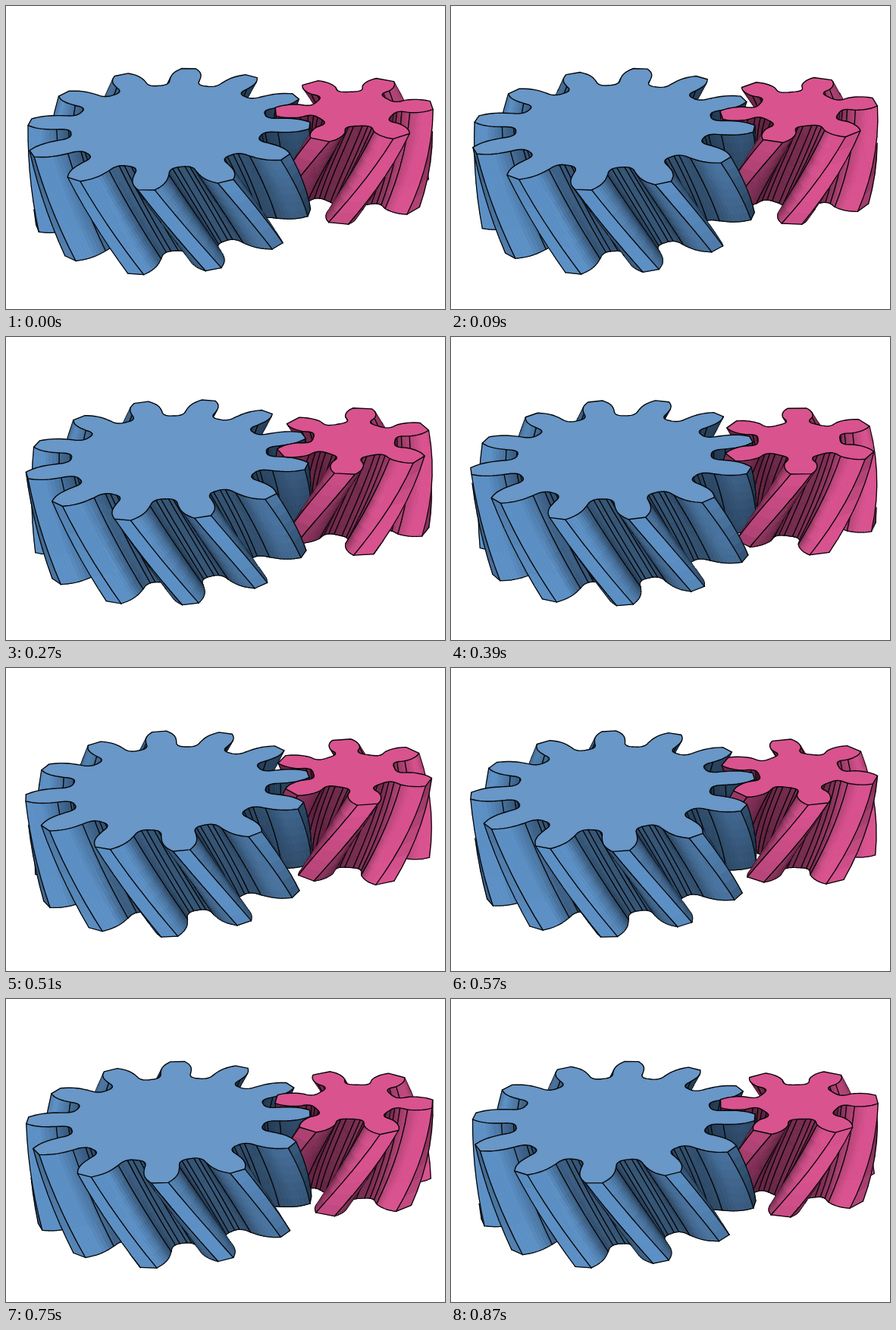
These frames come from a looping animation (579x400 px, 0.9 s). An HTML page with a canvas:

```html
<!DOCTYPE html>
<html lang="en">
<head>
<meta charset="utf-8">
<title>Helical gears</title>
<style>
html, body { margin: 0; width: 100%; height: 100%; overflow: hidden; background: #fff; }
canvas { display: block; }
</style>
</head>
<body>
<canvas id="stage" width="579" height="400"></canvas>
<script>
const ctx = document.getElementById('stage').getContext('2d');
const LOOP = 900, STEP = 30, SLICES = 7, SUB = 3;
const RAD = Math.PI / 180;
const HEIGHT = 0.637;
const LIGHT = [0, -0.85, 0.53];
const MESH = { x: .88, y: .18 };

// Half of a tooth, from tip corner to the middle of the gap: [radius, half angle].
const wheelTooth = [[1, .055], [.94, .1], [.87, .13], [.79, .145], [.74, .152], [.705, .18], [.69, .225], [.689, .262]];
const pinionTooth = [[.574, .125], [.53, .19], [.47, .245], [.41, .27], [.35, .25], [.315, .3], [.3, .42], [.298, .5236]];

const gears = [
  { x: 0, y: 0, teeth: 12, phase: 1.65, turn: 30, twist: -23.4,
    outline: buildOutline(wheelTooth, 12, [0, 3, 5, 6]),
    top: 'rgb(104,151,200)', lit: [92, 144, 197], dark: [24, 42, 62] },
  { x: 1.312, y: .26, teeth: 6, phase: 24.3, turn: -60, twist: 46.8,
    outline: buildOutline(pinionTooth, 6, [0, 3, 4, 5, 6]),
    top: 'rgb(217,83,143)', lit: [216, 82, 143], dark: [74, 25, 50] }
];

function spline(a, b, c, d, t) {
  return b + t / 2 * (c - a + t * (2 * a - 5 * b + 4 * c - d + t * (3 * (b - c) + d - a)));
}

function buildOutline(points, teeth, creases) {
  const side = [];
  const last = points.length - 1;
  const tip = points[0][0], root = points[last][0];
  const vertex = (r, a, crease) => ({ r, a, crease, rise: (r - root) / (tip - root) });
  for (let i = 0; i < last; i++) {
    const p = [points[Math.max(0, i - 1)], points[i], points[i + 1], points[Math.min(last, i + 2)]];
    for (let s = 0; s < SUB; s++) {
      const [r, a] = [0, 1].map(n => spline(p[0][n], p[1][n], p[2][n], p[3][n], s / SUB));
      side.push(vertex(r, a, s === 0 && creases.includes(i)));
    }
  }
  const left = side.map(p => ({ ...p, a: -p.a })).reverse();
  const tooth = [...left, ...side, vertex(...points[last], false)];
  const outline = [];
  for (let n = 0; n < teeth; n++) {
    const base = n * 2 * Math.PI / teeth;
    tooth.forEach(p => outline.push({ ...p, a: p.a + base }));
  }
  return outline;
}

function project(x, y, z) {
  const w = 1 + .09 * y - .045 * z;
  return {
    x, y, z,
    sx: 465 + (185.5 * x - 249.5) / w,
    sy: 200 + (-44.5 - 83.6 * y - 167.2 * z) / w
  };
}

function ring(gear, progress, depth) {
  const angle = (gear.phase + gear.turn * progress + gear.twist * depth) * RAD;
  return gear.outline.map(p =>
    project(gear.x + p.r * Math.sin(p.a + angle), gear.y + p.r * Math.cos(p.a + angle), -HEIGHT * depth));
}

const clamp = v => Math.min(1, Math.max(0, v));

function wallColor(gear, a, b, c, rise) {
  const u = [b.x - a.x, b.y - a.y, b.z - a.z];
  const v = [c.x - a.x, c.y - a.y, c.z - a.z];
  const n = [u[1] * v[2] - u[2] * v[1], u[2] * v[0] - u[0] * v[2], u[0] * v[1] - u[1] * v[0]];
  const dot = n.reduce((sum, k, i) => sum + k * LIGHT[i], 0) / (Math.hypot(...n) || 1);
  // Gaps between teeth and the place where the gears meet get less light.
  const gapShade = .4 + .6 * clamp(rise / .7);
  const meshShade = clamp(.3 + .9 * Math.hypot(a.x - MESH.x, a.y - MESH.y));
  const t = clamp(.14 + 1.15 * dot) * gapShade * meshShade;
  return `rgb(${gear.lit.map((k, i) => Math.round(gear.dark[i] + (k - gear.dark[i]) * t))})`;
}

function collectWalls(gear, rings, walls) {
  const { outline } = gear;
  const count = outline.length;
  for (let k = 0; k < SLICES; k++) {
    const upper = rings[k], lower = rings[k + 1];
    const visible = upper.map((a, j) => {
      const b = upper[(j + 1) % count], d = lower[j];
      return (b.sx - a.sx) * (d.sy - a.sy) - (b.sy - a.sy) * (d.sx - a.sx) < 0;
    });
    for (let j = 0; j < count; j++) {
      if (!visible[j]) continue;
      const next = (j + 1) % count;
      const quad = [upper[j], upper[next], lower[next], lower[j]];
      walls.push({
        quad,
        depth: quad.reduce((sum, p) => sum + .894 * p.y - .447 * p.z, 0),
        color: wallColor(gear, quad[0], quad[1], quad[3], (outline[j].rise + outline[next].rise) / 2),
        start: outline[j].crease || !visible[(j + count - 1) % count],
        end: outline[next].crease || !visible[next],
        base: k === SLICES - 1
      });
    }
  }
}

function trace(points) {
  ctx.beginPath();
  points.forEach(p => ctx.lineTo(p.sx, p.sy));
}

function inkLine(a, b) {
  trace([a, b]);
  ctx.stroke();
}

function drawWall({ quad, color, start, end, base }) {
  trace(quad);
  ctx.closePath();
  ctx.fillStyle = ctx.strokeStyle = color;
  ctx.lineWidth = .8;
  ctx.fill();
  ctx.stroke();
  ctx.strokeStyle = '#050505';
  ctx.lineWidth = 1.25;
  if (start) inkLine(quad[0], quad[3]);
  if (end) inkLine(quad[1], quad[2]);
  if (base) inkLine(quad[2], quad[3]);
}

function drawTop(gear, points) {
  trace(points);
  ctx.closePath();
  ctx.fillStyle = gear.top;
  ctx.fill();
  ctx.strokeStyle = '#050505';
  ctx.lineWidth = 1.4;
  ctx.stroke();
}

function draw(progress) {
  ctx.fillStyle = '#fff';
  ctx.fillRect(0, 0, 579, 400);
  const walls = [];
  const tops = gears.map(gear => {
    const rings = Array.from({ length: SLICES + 1 }, (_, k) => ring(gear, progress, k / SLICES));
    collectWalls(gear, rings, walls);
    return rings[0];
  });
  walls.sort((a, b) => b.depth - a.depth).forEach(drawWall);
  gears.forEach((gear, i) => drawTop(gear, tops[i]));
}

ctx.lineJoin = ctx.lineCap = 'round';
const began = performance.now();
let shown = -1;

function tick() {
  const time = Math.max(0, performance.now() - began) % LOOP;
  const step = Math.floor(time / STEP);
  if (step !== shown) {
    shown = step;
    draw(step * STEP / LOOP);
  }
  requestAnimationFrame(tick);
}
tick();
</script>
</body>
</html>
```
